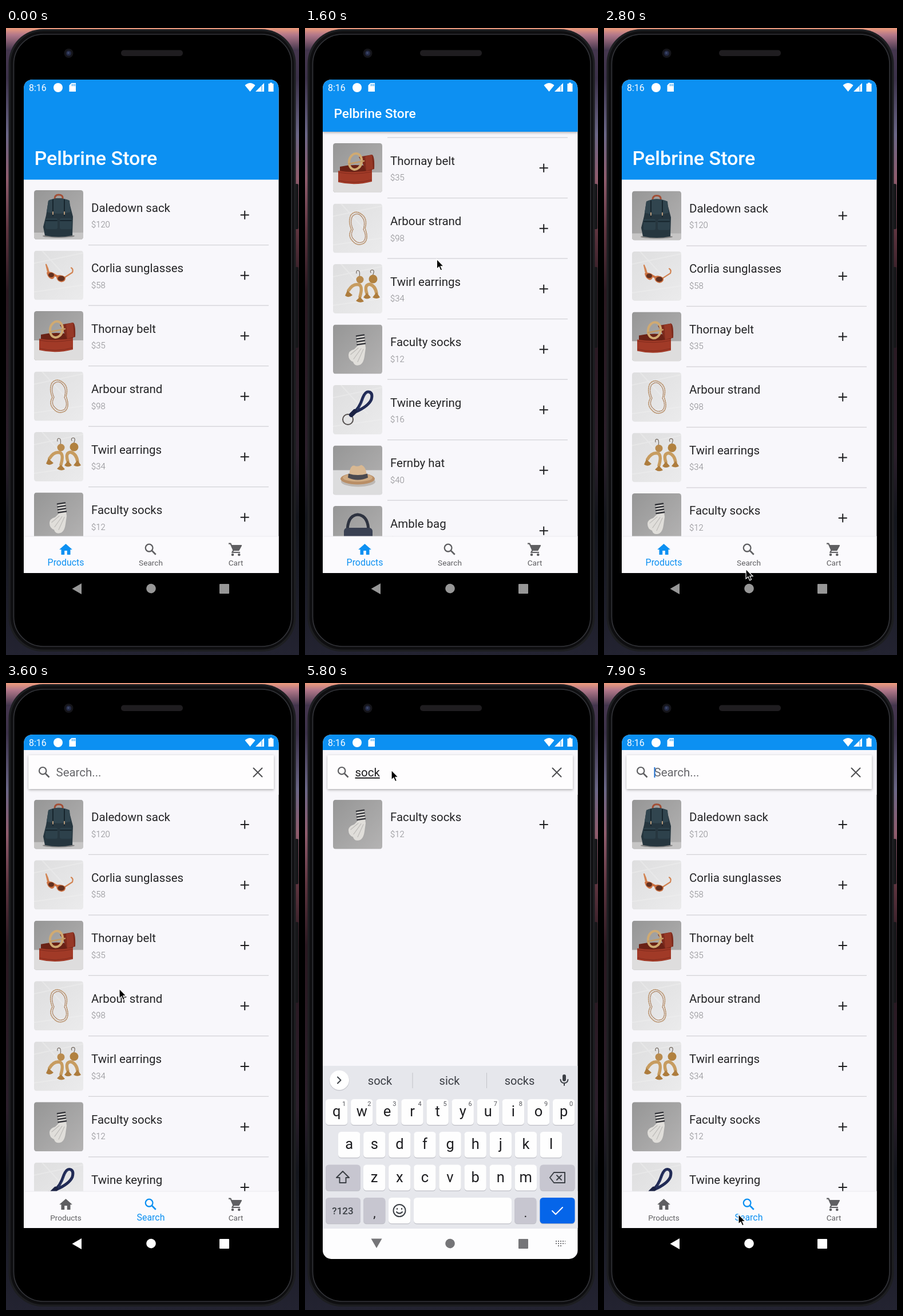
An HTML page for the animation above (8 s loop, 512x1094 px).

```html
<!DOCTYPE html>
<html lang="en">
<head>
<meta charset="utf-8">
<title>Shop demo</title>
<style>
  html, body { margin: 0; width: 100%; height: 100%; overflow: hidden; background: #000; }
  svg { display: block; width: 100%; height: 100%; }
  text { font-family: Roboto, sans-serif; white-space: pre; }
  .name { font-size: 20.45px; fill: #242426; }
  .price { font-size: 14.8px; font-weight: 300; fill: #858589; }
  .line { fill: none; stroke-linecap: round; stroke-linejoin: round; }
  .mid { text-anchor: middle; }
</style>
</head>
<body>
<svg id="stage" viewBox="0 0 512 1094" preserveAspectRatio="none"></svg>
<script>
const LOOP = 8000, STEP = 100;
const PITCH = 105.5;
const BLUE = '#0c90f2';

const rect = (x, y, w, h, fill, r = 0, more = '') =>
  `<rect x="${x}" y="${y}" width="${w}" height="${h}" rx="${r}" fill="${fill}" ${more}/>`;
const circle = (x, y, r, fill, more = '') => `<circle cx="${x}" cy="${y}" r="${r}" fill="${fill}" ${more}/>`;
const oval = (x, y, rx, ry, fill, more = '') =>
  `<ellipse cx="${x}" cy="${y}" rx="${rx}" ry="${ry}" fill="${fill}" ${more}/>`;
const path = (d, fill, more = '') => `<path d="${d}" fill="${fill}" ${more}/>`;
const line = (d, color, width, more = '') =>
  `<path class="line" d="${d}" stroke="${color}" stroke-width="${width}" ${more}/>`;
const text = (x, y, size, fill, str, more = '') =>
  `<text x="${x}" y="${y}" font-size="${size}" fill="${fill}" ${more}>${str}</text>`;
const at = (x, y, body) => `<g transform="translate(${x} ${y})">${body}</g>`;

// Thumbnails, 86 x 86 each
const wall = (horizon, floor = '#dcdcdd') =>
  rect(0, 0, 86, 86, 'url(#wall)') + rect(0, horizon, 86, 86 - horizon, floor);
const marble = rect(0, 0, 86, 86, 'url(#marble)') +
  line('M0 22L86 4M14 0L60 50M0 72L86 60', '#f0f0f1', 2, 'opacity=".4"');

const art = {
  sack: wall(74, '#c6c5c5') +
    line('M36 15Q36 8 43 8Q51 8 50 15', '#a34f36', 3) +
    oval(43, 80, 28, 3, '#858484') +
    path('M25 19Q43 9 61 19L68 46L67 79Q43 84 19 79L16 64L21 44Z', '#26363f') +
    path('M25 18Q43 10 62 18L64 38Q43 44 22 38Z', '#31454f') +
    rect(20, 49, 21, 19, '#2d414b', 3) + rect(45, 49, 21, 19, '#2d414b', 3) +
    line('M33 17V45M53 17V45M21 53H40M46 53H65', '#17252d', 2) +
    line('M33 38V42M53 38V42', '#b79a7b', 2),
  glasses: marble +
    line('M24 37L21 24Q24 30 26 38M53 47L67 38Q69 32 65 30', '#d28453', 2.2) +
    path('M22 38Q30 35 37 41L41 43Q48 41 55 46Q56 54 48 55Q40 54 39 46L36 45Q34 51 29 49Q23 46 22 38Z', '#cc7142') +
    oval(30, 42.5, 5, 4, '#63301f') + oval(47.5, 48.5, 6, 4.5, '#63301f'),
  belt: wall(51, '#dedddd') +
    path('M12 41Q38 35 68 41V52H12Z', '#6a2216') +
    path('M45 24L68 20Q73 22 72 45L58 49L52 36Z', '#7d2a1c') +
    path('M56 23L68 20L70 45L58 48Z', '#963826') +
    oval(39, 32, 11, 14, 'none', 'stroke="#d0aa72" stroke-width="4" transform="rotate(12 39 32)"') +
    line('M28 36L54 31', '#c49b65', 2.5) +
    path('M9 48Q38 53 68 47V67Q38 75 9 68Z', '#a13a27') +
    line('M10 51Q38 56 67 50M10 65Q38 72 67 64', '#812a1c', 1),
  strand: marble +
    line('M31 20Q40 9 53 21Q60 29 56 43Q63 62 54 69Q43 75 35 66Q25 57 32 45Q26 31 31 20Z', '#bd9a78', 1.8, 'stroke-dasharray="2 1.6"') +
    line('M34 22Q43 13 51 24Q57 31 53 45Q60 58 53 66Q44 71 37 63Q29 56 35 45Q29 31 34 22Z', '#ad8361', 1.4, 'stroke-dasharray="1.5 1.5"'),
  earrings: marble +
    line('M46 22Q48 11 43 11Q40 12 41 16M69 20Q74 10 68 10Q64 11 66 15', '#756b62', 1.2) +
    circle(47, 27, 6.5, '#b98b4e') + circle(70, 26, 7.5, '#b1813f') +
    line('M27 46Q35 33 46 36Q52 40 47 57M59 51Q54 36 64 35Q74 38 76 51', '#c79c60', 5.5) +
    path('M25 46L34 54Q28 60 21 55ZM47 57L54 65Q47 69 40 64ZM59 50L66 58Q59 63 53 58ZM76 49L82 58Q76 62 69 58Z', '#ad7c3d'),
  socks: rect(0, 0, 86, 86, 'url(#wall)') +
    path('M41 19L54 17L57 41L55 55Q53 70 44 71Q37 72 35 65Q27 62 27 53Q27 46 37 43L43 37Z', '#e0deda') +
    line('M44 41L31 52M49 42L36 60M53 43L43 65', '#bdbbb8', 1.2) +
    line('M41 20L54 18M41.5 25L54.500 23M42 30L55 28M42.500 35L56 33', '#35363b', 2.6),
  keyring: marble +
    circle(26, 60, 9, 'none', 'stroke="#55504f" stroke-width="2"') +
    line('M35 49Q46 41 52 22Q57 10 63 12Q70 14 67 25Q62 37 39 47', '#202a55', 5) +
    line('M37 48Q47 41 54 22Q58 12 63 14', '#42507f', 1, 'stroke-dasharray="2 2"') +
    line('M32 52L38 46', '#1b2244', 8),
  hat: wall(43) +
    oval(44, 63, 30, 9, '#bdb8b4') + oval(43, 58, 30, 10, '#b98e66') + oval(43, 56, 26, 7, '#cfab83') +
    path('M28 54Q29 34 37 35Q43 38 49 34Q58 36 59 54Q43 61 28 54Z', '#d8b892') +
    path('M27 49Q43 54 60 49L61 56Q43 64 26 56Z', '#4a4a50'),
  bag: wall(62) +
    line('M25 48Q24 17 43 15Q63 17 62 48', '#2e3340', 5) + rect(19, 38, 50, 36, '#394052', 6)
};

const products = [
  ['Daledown sack', 120, 'sack'], ['Corlia sunglasses', 58, 'glasses'], ['Thornay belt', 35, 'belt'],
  ['Arbour strand', 98, 'strand'], ['Twirl earrings', 34, 'earrings'], ['Faculty socks', 12, 'socks'],
  ['Twine keyring', 16, 'keyring'], ['Fernby hat', 40, 'hat'], ['Amble bag', 32, 'bag']
];

const row = ([name, price, kind]) => `<g class="row">
  <g transform="translate(49 0)" clip-path="url(#thumb)">${art[kind]}</g>
  <text class="name" x="149" y="37.5">${name}</text>
  <text class="price" x="149" y="65">$${price}</text>
  ${line('M409.700 43.200H424.700M417.200 35.700V50.700', '#1f1f21', 2, 'style="stroke-linecap:butt"')}
  ${rect(144, 95, 315, 1.3, '#d4d3d7', 0, 'class="divider"')}</g>`;

// Icons, centred on 0,0
const lens = (color, s = 1) => `<g transform="scale(${s})">` +
  circle(-2.8, -2.8, 6.2, 'none', `stroke="${color}" stroke-width="2.2"`) +
  line('M2 2L8.500 8.500', color, 2.6, 'style="stroke-linecap:butt"') + '</g>';
const home = path('M-2.300 9V2H2.300V9H8V0H11.300L0-10L-11.300 0H-8V9Z', 'currentColor');
const cart = line('M-12.500-10.300H-9L-4 1.200H5L9.500-7H-7.500M-4 1.200L-6.300 5H7.500', 'currentColor', 2.2, 'style="stroke-linecap:butt"') +
  path('M-8-8H10L5 2H-4Z', 'currentColor') + circle(-5.5, 9, 2.3, 'currentColor') + circle(5.8, 9, 2.3, 'currentColor');
const mic = rect(-3, -9, 6, 12, '#3c4046', 3) + line('M-6.500 0Q-6 6 0 6Q6 6 6.500 0M0 6V10', '#3c4046', 2);

const tab = (x, label, icon) => `<g class="tab">${at(x, 910, icon)}
  <text class="mid" x="${x}" y="938" fill="currentColor">${label}</text></g>`;

// Keyboard
const key = (x, y, w, fill = '#fefefe') =>
  rect(x, y + 1.3, w, 45, '#bfc0c7', 5.5) + rect(x, y, w, 45, fill, 5.5);
const letters = (chars, first, y, digits) => [...chars].map((c, i) => {
  const x = first + i * 44.1;
  return key(x - 19.2, y, 38.4) + text(x, y + 30, 25.5, '#1d1d20', c, 'class="mid"') +
    (digits ? text(x + 13, y + 12, 11, '#55565c', (i + 1) % 10, 'class="mid"') : '');
}).join('');
const GREY = '#c7c6d0', INK = '#3c4046';

const toolbar = `<g id="toolbar">
  ${line('M62.500 687.500L57 693L62.500 698.500', INK, 2)}
  ${at(118, 693, lens(INK))}
  ${at(181, 693, line('M-8-8H8V3L3 8H-8ZM8 2H2V8M-4-3V-2M4-3V-2M-4 2Q-1 5 2 3', INK, 2))}
  ${text(245, 698.5, 15.5, INK, 'GIF', 'class="mid" font-weight="900"')}
  ${at(310, 693, line('M-7.500-7.500H7.500V9H-7.500ZM-3-9.500H3V-5H-3ZM-4-1H4M-4 2H4M-4 5H1', INK, 1.9))}
  ${rect(349.5, 681, 1, 24, '#c4c5ca')}
  ${[-7, 0, 7].map(d => circle(389 + d, 693, 2.4, INK)).join('')}</g>`;
const suggestions = `<g id="suggestions">
  ${line('M57 687.500L62.500 693L57 698.500', INK, 2)}
  ${[131, 252.5, 375].map(x => text(x, 701, 20, '#3a3d43', '', 'class="mid word"')).join('')}
  ${rect(187.5, 680, 1, 27, '#c2c3c8')}${rect(317, 680, 1, 27, '#c2c3c8')}</g>`;

const keyboard = `<g id="keyboard">
  ${rect(31, 668, 446, 285, '#e6e7ec')}${rect(31, 952, 446, 400, '#fdfdfe')}
  ${circle(60, 694, 17.5, '#c9cad0')}${circle(60, 693, 17, '#fff')}${toolbar}${suggestions}
  ${at(453, 692, mic)}
  ${letters('qwertyuiop', 55.2, 726, true)}${letters('asdfghjkl', 77.2, 783)}
  ${key(36, 840.5, 61, GREY)}${letters('zxcvbnm', 121.2, 840.5)}${key(410.5, 840.5, 61, GREY)}
  ${at(66, 863, line('M0-11L11 0H5.500V9H-5.500V0H-11Z', INK, 2))}
  ${at(441, 863, line('M-13 0L-6-9H13V9H-6ZM-1-4L7 4M7-4L-1 4', INK, 2))}
  ${key(36, 898, 61, GREY)}${text(66, 927, 17, INK, '?123', 'class="mid" font-weight="500"')}
  ${key(102, 898, 38.4, GREY)}${text(121.5, 932, 22, '#1d1d20', ',', 'class="mid"')}
  ${key(146, 898, 38.4)}${circle(165, 920.5, 10.5, 'none', `stroke="${INK}" stroke-width="2"`)}
  ${line('M161 917V918M169 917V918M160 923Q165 928 170 923', INK, 2.2)}
  ${key(190, 898, 171)}
  ${key(366, 898, 38.4, GREY)}${text(385.5, 932, 22, '#1d1d20', '.', 'class="mid"')}
  ${key(410.5, 898, 61, '#0565e9')}${line('M432 921L438 927L450 915', '#fff', 2)}</g>`;

const keyboardDots = [0, 1, 2].map(r => line(`M${438 + (r === 2 ? 4 : 0)} ${974 + r * 4}H${r === 2 ? 450 : 455}`,
  '#77777a', 2, 'stroke-dasharray="2 2" style="stroke-linecap:butt"')).join('');

const phone = rect(0, 0, 512, 1094, 'url(#dusk)') + rect(0, 0, 512, 40, 'url(#sunset)') +
  rect(505, 272, 6, 79, '#17171a', 2) + rect(505, 417, 6, 141, '#17171a', 2) +
  rect(4.5, 2, 502, 1086, '#1d1e21', 60) +
  rect(8, 5.5, 495, 1079, '#0e0e10', 57) +
  rect(13.5, 11, 485.5, 1068, '#000', 52, 'stroke="#34353a" stroke-width="1.6"') +
  circle(109.5, 44, 8, '#15151a') + circle(109.5, 44, 4.5, '#242a45') + circle(109, 43.5, 2, '#3c4668') +
  rect(201, 38.5, 108, 10.5, '#1f1d20', 5);

const statusBar = text(40, 109.7, 15.9, '#fff', '8:16') + circle(91, 104, 8, '#fff') +
  path('M114.500 96H122V111H110.500V100Z', '#fff') + line('M115.500 98V101M118 98V101M120.300 98V101', BLUE, 1) +
  path('M417.500 100Q426.500 92 435.500 100L426.500 111Z', '#fff') +
  path('M451 96V111H436Z', '#fff') + line('M447 101V110', BLUE, 1) +
  path('M461 97V95.500H465V97H467.500V111H458.500V97Z', '#fff');

const searchPage = `<g id="search">
  ${rect(31, 117, 446, 78, '#f8f7fb')}${rect(31, 90, 446, 27, BLUE)}
  ${rect(39.5, 126, 428.5, 59, '#fefdfe', 1, 'filter="url(#shadow)"')}
  ${at(67, 156, lens('#5d5d60'))}
  <text id="query" x="87.5" y="162.7" font-size="20.45"></text>
  ${rect(87.5, 147, 2, 18, '#1d6fd0', 0, 'id="caret"')}
  ${line('M432.500 148.500L447.500 163.500M447.500 148.500L432.500 163.500', '#505053', 2.1)}</g>`;

const gradient = (id, stops, more = 'x2="0" y2="1"') => `<linearGradient id="${id}" ${more}>` +
  stops.map(([o, c]) => `<stop offset="${o}" stop-color="${c}"/>`).join('') + '</linearGradient>';

document.getElementById('stage').innerHTML = `<defs>
  ${gradient('dusk', [[0, '#4d3a52'], [.08, '#3b3149'], [.17, '#6a6686'], [.24, '#8f5c6d'], [.32, '#5f3540'], [.42, '#2a1820'], [.68, '#2b1f2b'], [.78, '#14161d'], [1, '#232331']])}
  ${gradient('sunset', [[0, '#ee9c7c'], [.3, '#b3788a'], [1, '#3f344b']])}
  ${gradient('wall', [[0, '#969696'], [1, '#b4b3b3']], 'x2="1" y2="1"')}
  ${gradient('marble', [[0, '#dededf'], [1, '#ebebec']], 'x2="1" y2="1"')}
  <clipPath id="thumb">${rect(0, 0, 86, 86, '#000', 4.5)}</clipPath>
  <clipPath id="app"><path d="M31 951V107Q31 90 48 90H459.500Q476.500 90 476.500 107V951Z"/></clipPath>
  <clipPath id="screen">${rect(31, 90, 445.5, 915, '#000', 15)}</clipPath>
  <filter id="shadow" x="-10%" y="-20%" width="120%" height="150%"><feDropShadow dx="0" dy="1.5" stdDeviation="2" flood-opacity=".32"/></filter>
</defs>
${phone}
<g clip-path="url(#app)">
  ${rect(31, 90, 446, 861, '#f8f7fb')}
  ${products.map(row).join('')}
  <g id="header">${rect(31, 90, 446, 174, BLUE, 0, 'id="bar"')}
    <text id="title" font-size="22.7" font-weight="500" fill="#fff">Pelbrine Store</text></g>
  ${searchPage}${statusBar}
  ${rect(31, 887, 446, 64, '#fbfafd')}${rect(31, 886.5, 446, 1, '#ececf0')}
  ${tab(104.5, 'Products', home)}${tab(253, 'Search', lens('currentColor', 1.03))}${tab(401.5, 'Cart', cart)}
</g>
<g clip-path="url(#screen)">${keyboard}</g>
<g id="nav">${path('', 'currentColor', 'id="back"')}${circle(253.5, 978, 8.3, 'currentColor')}${rect(373, 970, 17, 17, 'currentColor', 1)}</g>
<g id="dots">${keyboardDots}</g>
${path('M0 0V17L3.900 13.500L6.600 19.700L9.500 18.400L6.800 12.400H12Z', '#000', 'id="pointer" stroke="#fff" stroke-width="1.2"')}`;

const $ = id => document.getElementById(id);
const all = selector => [...document.querySelectorAll(selector)];
const rows = all('.row'), dividers = all('.divider'), tabs = all('.tab'), words = all('.word');
const show = (el, on) => { el.style.display = on ? '' : 'none'; };
const move = (el, x, y, s = 1) => el.setAttribute('transform', `translate(${x} ${y}) scale(${s})`);

// Each entry: time, then values
const scrollTrack = [[200, 0], [500, 70], [1100, 269], [1500, 298], [1800, 283], [2100, 219.3], [2500, 20], [2700, -1.4]];
const keyboardTrack = [[4000, 340], [4100, 210], [4200, 90], [4300, 30], [4400, 8], [4500, 0], [6900, 0], [7000, 60], [7200, 340]];
const pointerTrack = [[200, 262, 1090], [500, 232, 690], [1100, 224.5, 411], [1500, 229, 395], [1800, 233, 420],
  [2100, 236.5, 507], [2500, 246, 860], [2800, 248, 944], [3000, 247, 925], [3300, 245, 915], [3900, 151, 152],
  [5900, 151, 152], [6300, 436, 152], [6500, 436, 152], [6800, 124, 972], [7100, 124, 972], [7600, 235, 927]];
const typing = [[4900, 's'], [5100, 'so'], [5300, 'soc'], [5500, 'sock'], [6400, '']];
const SEARCH_START = 3000;

function sample(track, t) {
  const next = track.findIndex(k => k[0] > t);
  if (next <= 0) return track[next < 0 ? track.length - 1 : 0].slice(1);
  const a = track[next - 1], b = track[next], p = (t - a[0]) / (b[0] - a[0]);
  return a.slice(1).map((v, i) => v + (b[i + 1] - v) * p);
}

function render(t) {
  const searching = t >= SEARCH_START;
  const query = typing.reduce((q, [time, value]) => t >= time ? value : q, '');
  const [scroll] = sample(scrollTrack, t);
  const [drop] = sample(keyboardTrack, t);
  const typed = drop < 335;

  const top = searching ? 203.7 : 283 - scroll;
  const shown = products.map((p, i) => i).filter(i => !searching || products[i][0].includes(query));
  rows.forEach((el, i) => {
    const place = shown.indexOf(i);
    show(el, place >= 0);
    move(el, 0, top + place * PITCH);
    show(dividers[i], place < shown.length - 1);
  });

  const bottom = Math.min(264.6, Math.max(181, 264.6 - scroll));
  const open = (bottom - 181) / 83.6;
  show($('header'), !searching);
  $('bar').setAttribute('height', bottom - 90);
  $('bar').setAttribute('filter', open < .05 ? 'url(#shadow)' : 'none');
  move($('title'), 50.5 - open, bottom - 24 - open * 1.6, 1 + open / 2);

  show($('search'), searching);
  $('query').textContent = query || 'Search...';
  $('query').setAttribute('fill', query ? '#1d1d1f' : '#66666a');
  $('query').setAttribute('text-decoration', query ? 'underline' : 'none');
  show($('caret'), t >= 6400 && !query && t % 1000 >= 400);

  tabs.forEach((el, i) => {
    const active = i === (searching ? 1 : 0);
    el.style.color = active ? BLUE : '#5f5f62';
    el.style.fontSize = active ? '15.9px' : '13.65px';
  });

  show($('keyboard'), typed);
  move($('keyboard'), 0, drop);
  show($('toolbar'), !query);
  show($('suggestions'), query);
  [query, 'sick', 'socks'].forEach((word, i) => { words[i].textContent = word; });
  show($('dots'), typed);
  $('nav').style.color = typed ? '#757578' : searching ? '#fff' : '#979797';
  $('back').setAttribute('d', typed ? 'M115.500 969.500H134.500L125 986Z' : 'M115.500 978.500L132 969V988Z');

  show($('pointer'), t >= 200);
  move($('pointer'), ...sample(pointerTrack, t));
}

function frame() {
  render(Math.floor(performance.now() % LOOP / STEP) * STEP);
  requestAnimationFrame(frame);
}
frame();
</script>
</body>
</html>
```
